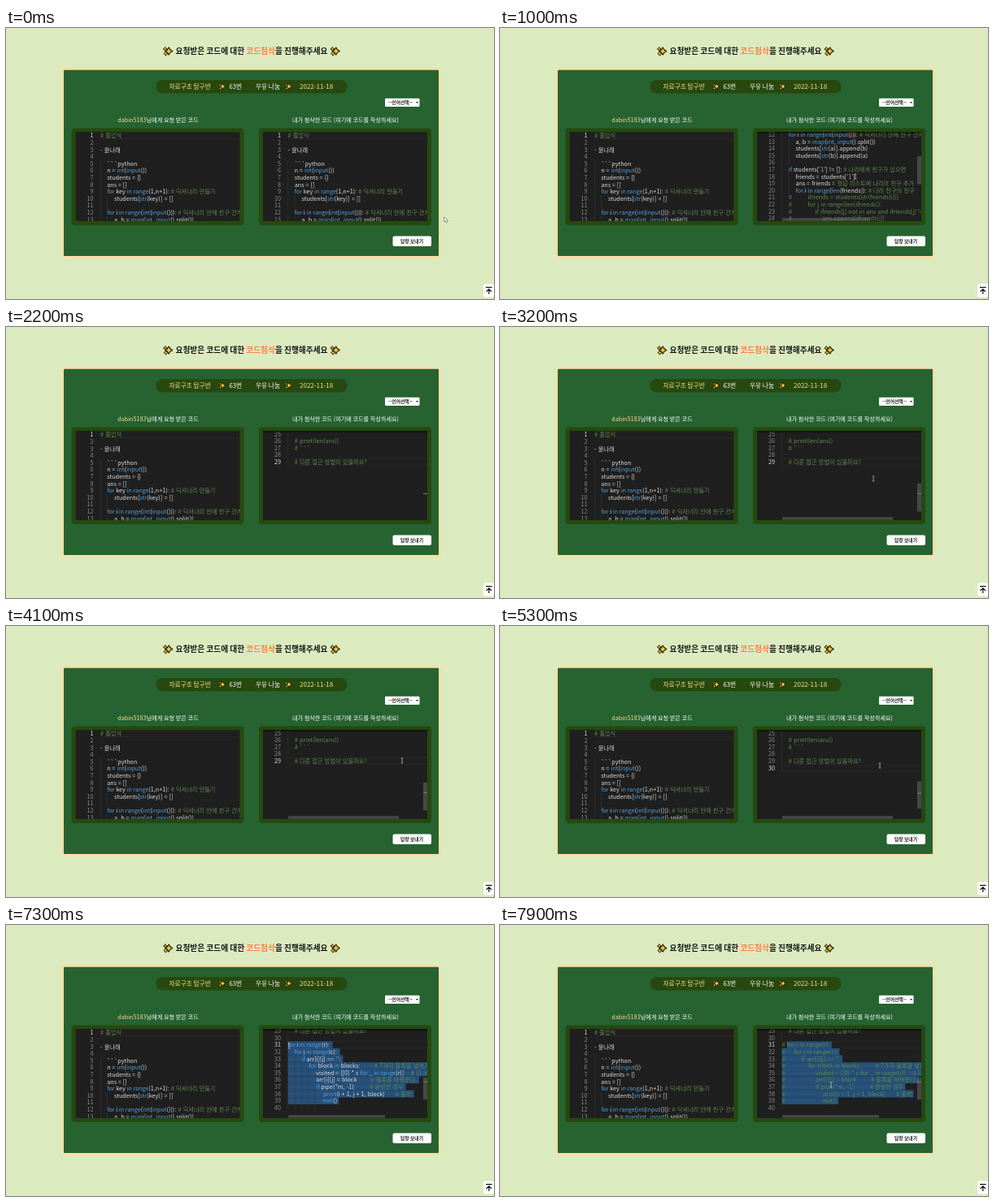
Write an HTML page with a canvas that moves like this. It is 600x334 px and loops after 8 s.

```html
<!DOCTYPE html>
<html lang="ko">
<head>
<meta charset="utf-8">
<style>
html, body { margin: 0; width: 100%; height: 100%; overflow: hidden; background: #dcebbf; }
canvas { display: block; width: 600px; height: 334px; }
</style>
</head>
<body>
<canvas id="stage"></canvas>
<script>
const W = 600, H = 334, LOOP = 8000;
const FONT = '"Noto Sans CJK KR", "Noto Sans CJK", "Noto Sans", sans-serif';
const LINE = 8.6, CODE = 7.2, TOP = 128, VIEW = 110;
const canvas = document.getElementById('stage');
const ctx = canvas.getContext('2d');
const dpr = window.devicePixelRatio || 1;
canvas.width = W * dpr;
canvas.height = H * dpr;

const BASE = `# 졸업식

- 윤나래

    \`\`\`python
    n = int(input())
    students = {}
    ans = []
    for key in range(1,n+1): # 딕셔너리 만들기
        students[str(key)] = []

    for i in range(int(input())): # 딕셔너리 안에 친구 관계 넣기
        a, b = map(int, input().split())
        students[str(a)].append(b)
        students[str(b)].append(a)

    if students['1'] != []: # 나리에게 친구가 있으면
        friends = students['1']
        ans = friends # 정답 리스트에 나리의 친구 추가
        for i in range(len(friends)): # 나리 친구의 친구
    #         ifriends = students[str(friends[i])]
    #         for j in range(len(ifriends)):
    #             if ifriends[j] not in ans and ifriends[j] != 1:
    #                 ans.append(ifriends[j])

    # print(len(ans))
    # \`\`\`
`.split('\n');

const QUESTION = '    # 다른 접근 방법이 있을까요?';

const PASTED = `for i in range(r):
    for j in range(c):
        if arr[i][j] == '.':
            for block in blocks:        # 7가지 블록을 넣어가며
                visited = [[0] * c for _ in range(r)]    # 다 비움
                arr[i][j] = block        # 블록을 바꿔준다.
                if pipe(*m, -1):        # 완성한 경우
                    print(i + 1, j + 1, block)      # 출력
                    exit()
`.split('\n');

const TOKEN = /#.*$|'[^']*'|\b(?:for|in|range|int|input|map|str|len|if|not|and|print|exit)\b|[^#'\w]+|\w+/g;
const KEYWORD = /^(for|in|range|int|input|map|str|len|if|not|and|print|exit)$/;

const clamp = v => Math.max(0, Math.min(1, v));
const smooth = v => v * v * (3 - 2 * v);

// Eased interpolation through rows of [time, value, value...]
function track(rows, t) {
  let i = 0;
  while (i < rows.length - 2 && t > rows[i + 1][0]) i++;
  const a = rows[i], b = rows[i + 1];
  const k = smooth(clamp((t - a[0]) / (b[0] - a[0])));
  return a.slice(1).map((v, n) => v + (b[n + 1] - v) * k);
}

function box(x, y, w, h, color, r = 0) {
  ctx.fillStyle = color;
  ctx.beginPath();
  ctx.roundRect(x, y, w, h, r);
  ctx.fill();
}

function setFont(size, weight = 400) {
  ctx.font = `${weight} ${size}px ${FONT}`;
}

// Draws runs of [text, color] one after another, y being the middle of the line
function label(runs, x, y, size, weight = 400, align = 'left') {
  setFont(size, weight);
  const width = runs.reduce((sum, r) => sum + ctx.measureText(r[0]).width, 0);
  if (align === 'center') x -= width / 2;
  for (const [text, color] of runs) {
    ctx.fillStyle = color;
    ctx.fillText(text, x, y + size * 0.36);
    x += ctx.measureText(text).width;
  }
}

function star(x, y, r, outline) {
  ctx.beginPath();
  ctx.moveTo(x, y - r);
  for (let i = 1; i <= 4; i++) {
    const a = -Math.PI / 2 + i * Math.PI / 2, m = a - Math.PI / 4;
    ctx.quadraticCurveTo(x + Math.cos(m) * r * 0.25, y + Math.sin(m) * r * 0.25,
      x + Math.cos(a) * r, y + Math.sin(a) * r);
  }
  ctx.closePath();
  ctx.lineJoin = 'round';
  ctx.lineWidth = outline;
  ctx.strokeStyle = '#1c1a08';
  ctx.stroke();
  ctx.fillStyle = '#f2c83a';
  ctx.fill();
}

function sparkles(x, y, s) {
  star(x + s * 0.12, y, s * 0.4, s * 0.2);
  star(x - s * 0.32, y - s * 0.26, s * 0.18, s * 0.16);
  star(x - s * 0.25, y + s * 0.3, s * 0.2, s * 0.16);
}

function codeLine(text, x, y) {
  for (const part of text.match(TOKEN) || []) {
    ctx.fillStyle = part[0] === '#' ? '#608b4e'
      : part[0] === "'" ? '#ce9178'
      : KEYWORD.test(part) ? '#4f9fdc' : '#dcdcdc';
    ctx.fillText(part, x, y);
    x += ctx.measureText(part).width;
  }
}

function editor(x, lines, view) {
  const codeX = x + 30.5, top = TOP + 0.4 - view.scroll;
  box(x - 5, 123.5, 212, 119.5, '#25490f', 4);
  ctx.save();
  ctx.beginPath();
  ctx.rect(x, TOP, 202, VIEW);
  ctx.clip();
  box(x, TOP, 202, VIEW, '#1f1f1f');
  setFont(CODE, 500);
  ctx.wordSpacing = '0.6px';
  const widthOf = s => ctx.measureText(s).width;
  const tab = widthOf('    ');

  const activeY = top + (view.active - 1) * LINE;
  ctx.fillStyle = '#2b2b2b';
  ctx.fillRect(codeX, activeY, 172, 0.7);
  ctx.fillRect(codeX, activeY + LINE - 0.7, 172, 0.7);

  let level = 0;
  lines.forEach((text, i) => {
    const y = top + i * LINE, num = i + 1, base = y + LINE / 2 + 2.7;
    if (text.trim()) level = Math.floor(text.search(/\S/) / 4);
    if (y < TOP - LINE || y > TOP + VIEW) return;

    const sel = view.select;
    const marked = sel && num >= sel.from && num <= sel.to;
    const start = marked && num === sel.from ? sel.col : 0;
    if (marked) {
      const x0 = widthOf(text.slice(0, start));
      box(codeX + x0, y, widthOf(text) + 2.2 - x0, LINE + 0.2, '#264f78');
    }
    ctx.fillStyle = '#363636';
    for (let g = 0; g < level; g++) ctx.fillRect(codeX + g * tab, y, 0.6, LINE);
    codeLine(text, codeX, base);
    if (marked) {
      ctx.fillStyle = 'rgba(220,225,230,.25)';
      for (let c = start; c < text.length; c++) {
        if (text[c] === ' ') ctx.fillRect(codeX + widthOf(text.slice(0, c)) + 0.8, y + 4.2, 0.7, 0.7);
      }
    }
    ctx.textAlign = 'right';
    ctx.fillStyle = num === view.active ? '#e0e0e0' : '#8a8a8a';
    ctx.fillText(num, x + 22, base);
    ctx.textAlign = 'left';
  });
  ctx.wordSpacing = '0px';

  if (view.scroll > 1) {
    const shade = ctx.createLinearGradient(0, TOP, 0, TOP + 3);
    shade.addColorStop(0, 'rgba(0,0,0,.6)');
    shade.addColorStop(1, 'rgba(0,0,0,0)');
    ctx.fillStyle = shade;
    ctx.fillRect(x, TOP, 202, 3);
  }
  const content = (lines.length - 1) * LINE + VIEW;
  if (view.mark) box(x + 197, TOP + (view.active - 0.5) * LINE / content * VIEW, 5, 0.9, '#8c8c8c');
  if (view.bars > 0) {
    ctx.globalAlpha = view.bars;
    const thumb = 'rgba(121,121,121,.45)';
    box(x + 197, TOP + view.scroll / content * VIEW, 5, VIEW * VIEW / content, thumb);
    box(x + 31, 234.2, view.barWidth, 3.6, thumb);
    ctx.globalAlpha = 1;
  }
  ctx.restore();
}

function pointer(x, y, flip) {
  ctx.save();
  ctx.translate(x, y);
  if (flip) ctx.scale(-1, 1);
  ctx.beginPath();
  [[0, 0], [0, 6], [1.4, 4.8], [2.4, 7], [3.3, 6.6], [2.4, 4.5], [4.2, 4.4]]
    .forEach(p => ctx.lineTo(p[0], p[1]));
  ctx.closePath();
  ctx.lineWidth = 0.8;
  ctx.strokeStyle = flip ? '#f4f4f4' : '#202020';
  ctx.stroke();
  ctx.fillStyle = '#f4f4f4';
  ctx.fill();
  ctx.restore();
}

function beam(x, y) {
  ctx.fillStyle = '#c8c8c8';
  ctx.fillRect(x - 0.35, y - 3, 0.7, 6);
  ctx.fillRect(x - 1.3, y - 3.3, 2.6, 0.6);
  ctx.fillRect(x - 1.3, y + 2.7, 2.6, 0.6);
}

function card() {
  ctx.save();
  ctx.shadowColor = '#fbdda4';
  ctx.shadowBlur = 2 * dpr;
  box(69, 49.5, 465, 233.5, '#fbdda4', 3);
  ctx.restore();
  box(71, 51.7, 461, 229.3, '#266331', 1);
}

function page() {
  box(0, 0, W, H, '#dcebbf');
  label([['요청받은 코드에 대한 ', '#171717'], ['코드첨삭', '#ff7f45'], ['을 진행해주세요', '#171717']],
    302, 28.6, 9.7, 700, 'center');
  sparkles(199, 28.5, 10);
  sparkles(404.5, 28.5, 10);

  card();
  box(184.5, 64, 235, 16.5, '#27490f', 8);
  const cream = '#f7e08f', white = '#ffffff';
  label([['자료구조 탐구반', cream]], 200.5, 72, 7.7, 500);
  label([['63번', white]], 274.5, 72, 7.7, 500);
  label([['우유 나눔', white]], 307, 72, 7.7, 500);
  label([['2022-11-18', cream]], 361, 72, 8, 500);
  sparkles(265.5, 72, 7.5);
  sparkles(347, 72, 7.5);

  box(466, 86.8, 42.5, 10.2, white, 1);
  label([['--언어선택--', '#222']], 470, 91.8, 5.8, 700);
  ctx.fillStyle = '#222';
  ctx.beginPath();
  ctx.moveTo(504, 91);
  ctx.lineTo(507, 91);
  ctx.lineTo(505.5, 93);
  ctx.fill();

  label([['dabin5183', '#f9d594'], ['님에게 요청 받은 코드', white]], 187, 113.7, 7.2, 500, 'center');
  label([['내가 첨삭한 코드 (여기에 코드를 작성하세요)', white]], 417.5, 113.7, 7.15, 500, 'center');

  box(475.5, 256.5, 47.5, 12.5, white, 2);
  label([['답장 보내기', '#222']], 499, 262.5, 5.8, 700, 'center');

  box(587, 315.5, 13, 16, white, 2);
  ctx.strokeStyle = '#111';
  ctx.lineWidth = 1.2;
  ctx.beginPath();
  ctx.moveTo(590, 319.7); ctx.lineTo(597.6, 319.7);
  ctx.moveTo(593.8, 328); ctx.lineTo(593.8, 322);
  ctx.moveTo(590.6, 325); ctx.lineTo(593.8, 321.8); ctx.lineTo(597, 325);
  ctx.stroke();
}

const SCROLL = [[600, 0], [1000, 96], [1350, 207.2], [5700, 207.2], [5900, 243], [8000, 243]];
const MOUSE = [[0, 539, 233], [500, 437, 183], [1400, 437, 183], [3000, 455, 190], [3900, 487, 166],
  [4600, 487, 166], [5200, 467, 172], [6000, 467, 172], [6400, 411, 216], [6700, 343.5, 161],
  [6900, 348, 149], [7300, 348, 149], [7700, 407, 197], [8000, 407, 197]];
// Top line and column of the selection while dragging upwards
const DRAG = [[6450, 39.9, 22], [6700, 37.5, 19], [6900, 31, 0]];
const TYPE_AT = 1500, TYPE_END = 2100, ENTER = 4900, PASTE = 5700, COMMENT = 7400;

function documentAt(t) {
  const typed = Math.round(QUESTION.length * clamp((t - TYPE_AT) / (TYPE_END - TYPE_AT)));
  const lines = BASE.slice(0, 28).concat(QUESTION.slice(0, typed));
  if (t >= ENTER) lines.push('');
  if (t >= PASTE) {
    lines.push(...PASTED.map(s => t >= COMMENT && s ? '# ' + s : s));
  }
  return lines;
}

function rightView(t) {
  const view = { scroll: track(SCROLL, t)[0], active: 1, mark: t >= TYPE_AT };
  if (t >= TYPE_AT) view.active = 29;
  if (t >= ENTER) view.active = 30;
  if (t >= PASTE) view.active = 39;
  if (t >= DRAG[0][0]) {
    const [from, col] = track(DRAG, t).map(Math.floor);
    view.select = { from, to: 39, col: t >= COMMENT ? 2 : col };
    view.active = from;
  }
  view.bars = t < 1400 ? clamp((t - 250) / 150) : t < 2900 ? clamp((1900 - t) / 400) : clamp((t - 2900) / 150);
  view.barWidth = t < TYPE_AT ? 108 : t < PASTE ? 136 : 119;
  return view;
}

function draw(now) {
  const t = now % LOOP;
  ctx.setTransform(dpr, 0, 0, dpr, 0, 0);
  page();
  editor(85.5, BASE, { scroll: 0, active: 1, bars: 0 });
  editor(316, documentAt(t), rightView(t));
  if (t < 1500 || t > 2900) {
    const [x, y] = track(MOUSE, t);
    if (x > 518) pointer(x, y);
    else if (x < 346) pointer(x, y, true);
    else beam(x, y);
  }
  requestAnimationFrame(draw);
}
requestAnimationFrame(draw);
</script>
</body>
</html>
```
